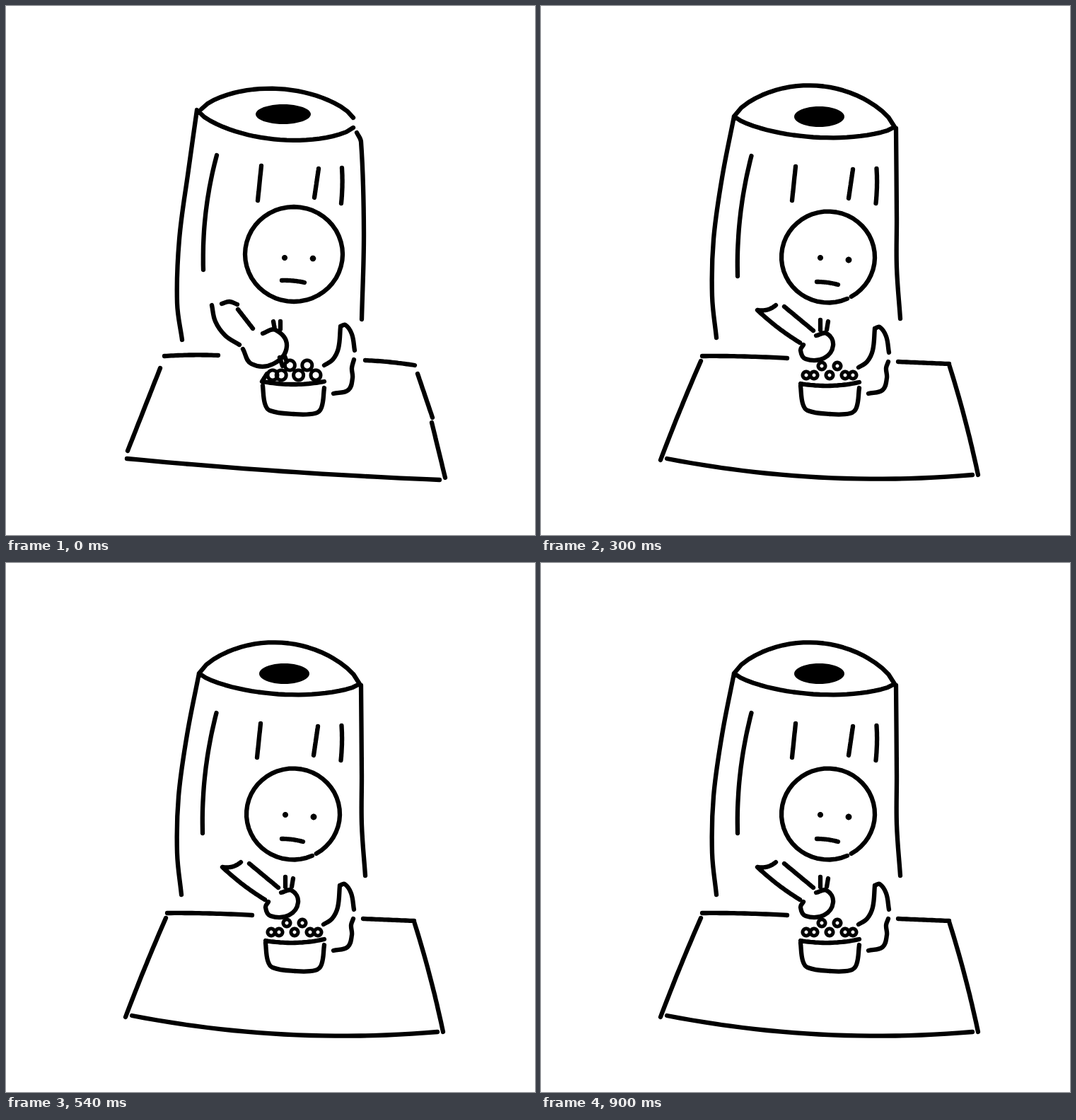
An HTML page that plays this animation: 748 by 748 pixels, repeating every 960 ms.

```html
<!DOCTYPE html>
<html lang="en">
<head>
<meta charset="utf-8">
<title>Lunch</title>
<style>
  html, body { margin: 0; width: 100%; height: 100%; overflow: hidden; background: #fff; }
  svg { display: block; width: 100%; height: 100%; }
  path { fill: none; stroke: #000; stroke-width: 6.3; stroke-linecap: round; stroke-linejoin: round; }
  #food { stroke-width: 5; }
  #fill { fill: #000; stroke: none; }
</style>
</head>
<body>
<svg viewBox="0 0 748 748"><path id="ink"/><path id="food"/><path id="fill"/></svg>
<script>
const TAU = 2 * Math.PI;
const range = n => Array.from({ length: n }, (_, i) => i);
const poly = pts => "M" + pts.map(p => p.map(v => v.toFixed(1))).join("L");

// Bent line; h pushes the middle to the right-hand side of travel, a low power makes it rounder.
function bow(x1, y1, x2, y2, h = 0, power = 1) {
  const dx = x2 - x1, dy = y2 - y1, len = Math.hypot(dx, dy);
  return poly(range(25).map(i => {
    const t = i / 24, k = h * (4 * t * (1 - t)) ** power / len;
    return [x1 + dx * t - dy * k, y1 + dy * t + dx * k];
  }));
}

// Ellipse with an optional gap centred on an angle, and a tilt.
function oval(cx, cy, rx, ry, gap = 0, at = 0, tilt = 0) {
  const c = Math.cos(tilt), s = Math.sin(tilt);
  return poly(range(49).map(i => {
    const a = at + gap / 2 + (TAU - gap) * i / 48;
    const x = rx * Math.cos(a), y = ry * Math.sin(a);
    return [cx + x * c - y * s, cy + x * s + y * c];
  }));
}
const ring = (x, y, r) => oval(x, y, r, r);

// Smooth line through key points given as x, y, x, y...
function curve(...v) {
  const pts = range(v.length / 2).map(i => [v[2 * i], v[2 * i + 1]]);
  const last = pts.length - 1;
  const dir = i => {
    const a = pts[Math.max(i - 1, 0)], b = pts[Math.min(i + 1, last)];
    const dx = b[0] - a[0], dy = b[1] - a[1], len = Math.hypot(dx, dy);
    return [dx / len, dy / len];
  };
  let d = "M" + pts[0];
  for (let i = 0; i < last; i++) {
    const [x, y] = pts[i], [u, w] = pts[i + 1];
    const h = Math.hypot(u - x, w - y) * 0.37, s = dir(i), e = dir(i + 1);
    d += `C${x + s[0] * h},${y + s[1] * h} ${u - e[0] * h},${w - e[1] * h} ${u},${w}`;
  }
  return d;
}

// Parts that only shift a little between the drawings
const lid = (x1, y1, x2, y2, h) => bow(x1, y1, x2, y2, h, 0.75);
const streaks = (x, y, end) => [
  bow(298 + x / 2, 211 + y, 279 + x, end, 6),
  bow(361 + x, 226 + y, 356 + x, 275),
  bow(442 + x, 230 + y, 436 + x, 271 + y),
  bow(475 + x / 2, 229 + y, 474 + x / 2, 279, -1)
];
const rightArm = (x, y) => [
  curve(450 + x, 508 + y, 462 + x, 500 + y, 470 + x, 484 + y, 473 + x, 453 + y),
  curve(473 + x, 453 + y, 480 + x, 451 + y, 489 + x, 464 + y, 493 + x, 487 + y),
  curve(492 + x, 500 + y, 489 + x, 512, 490 + x, 526, 484 + x, 543, 463, 548)
];
const bowl = (l, r, rimL, rimR) => [
  curve(l, 537, l + 3, 562, l + 10, 572, (l + r) / 2, 577, r - 13, 576, r - 4, 568, r, 540),
  bow(l, rimL, r, rimR, 4)
];
// Zigzag heap: both ends and every other piece lie in the lower row.
const heap = (n, x, step, low, high, r) => range(n).map(i =>
  ring(x + i * step, i % 2 || i === 0 || i === n - 1 ? low : high, r));

const reach = {
  ink: [
    lid(276, 146, 491, 158, -35), lid(272, 149, 491, 172, 28),
    curve(270, 147, 258, 232, 245, 330, 242, 420, 249, 472),
    curve(496, 179, 502, 192, 506, 320, 503, 443),
    streaks(0, 0, 373),
    oval(407, 351, 69, 67), bow(390, 388, 422, 391, -1),
    curve(291, 423, 296, 446, 310, 466, 330, 479),
    curve(305, 421, 316, 418, 327, 422), bow(328, 429, 349, 456),
    curve(363, 463, 381, 458, 397, 481, 378, 506, 347, 506, 335, 485),
    bow(378, 446, 380, 457), bow(388, 446, 388, 457),
    bow(387, 497, 391, 509), bow(394, 495, 397, 503),
    rightArm(0, 0), bowl(363, 450, 531, 531), bow(362, 531, 369, 520),
    bow(224, 495, 300, 494, -1), bow(508, 501, 578, 508, -1),
    bow(218, 512, 172, 629), bow(171, 640, 613, 670, 3),
    bow(582, 520, 603, 582), bow(602, 589, 621, 667)
  ],
  food: heap(6, 377, 12.2, 522, 508, 7),
  fill: [oval(392, 153, 39, 14), ring(394, 356, 4), ring(434, 357, 4.3)]
};

const middle = {
  ink: [
    lid(273, 156, 500, 171, -51), lid(273, 156, 500, 171, 22),
    curve(273, 156, 256, 243, 244, 330, 242, 410, 248, 469),
    curve(502, 173, 503, 300, 503, 370, 508, 442),
    streaks(-1, 1, 382),
    oval(406, 355, 66, 64.5, 0.1, 1.1), bow(390, 390, 420, 394, -1),
    bow(332, 423, 307, 430, -3), bow(306, 430, 366, 476, 2), bow(344, 425, 385, 459),
    curve(389, 466, 404, 463, 413, 480, 400, 498, 374, 499, 367, 487, 371, 479),
    bow(395, 444, 395, 458), bow(406, 446, 404, 458),
    rightArm(-1, 3), bowl(367, 450, 534, 532),
    bow(228, 495, 348, 498, -1), bow(505, 503, 577, 506),
    bow(226, 502, 169, 642, 1), bow(178, 640, 610, 663, 15), bow(577, 507, 618, 663, -2)
  ],
  food: heap(7, 375, 11, 522, 509, 5),
  fill: [oval(393.5, 156.5, 35.5, 14.5), ring(395, 356, 4), ring(435, 359, 4.4)]
};

const dip = {
  ink: [
    lid(275, 160, 507, 170, -46), lid(274, 160, 500, 169, 18),
    curve(275, 163, 254, 285, 245, 380, 249, 472),
    curve(507, 170, 508, 300, 512, 437),
    streaks(3, 3, 397),
    oval(405, 354, 65.5, 67, 0.12, 0.83), bow(390, 393, 418, 395, -3),
    bow(346, 430, 364, 428, -3), bow(342, 433, 391, 471), bow(369, 434, 412, 457, 3),
    curve(412, 458, 425, 457, 429, 472, 417, 488, 396, 487, 391, 473),
    bow(423, 441, 422, 453), bow(433, 445, 429, 457),
    bow(412, 491, 411, 508), bow(418, 489, 418, 506),
    rightArm(2, 1), bowl(368, 450, 536, 534),
    bow(232, 494, 367, 500), bow(507, 504, 576, 507),
    bow(232, 494, 173, 634, 1), bow(173, 634, 607, 656, 10), bow(575, 511, 608, 662)
  ],
  food: range(4).map(i => ring(379 + 20 * i, 512, 7) + ring(378 + 21 * i, 524, 5)),
  fill: [oval(393, 157, 35, 13, 0, 0, 0.15), ring(395, 357, 5.2), ring(436, 360, 4)]
};

const cycle = [reach, middle, dip, middle];
const STEP = 60;
const start = performance.now();
let shown = null;

function draw(ms) {
  const pose = cycle[Math.floor(ms / STEP) % cycle.length];
  if (pose === shown) return;
  shown = pose;
  for (const id in pose) document.getElementById(id).setAttribute("d", pose[id].flat().join(""));
}

function tick() {
  draw(performance.now() - start);
  requestAnimationFrame(tick);
}
tick();
</script>
</body>
</html>
```
